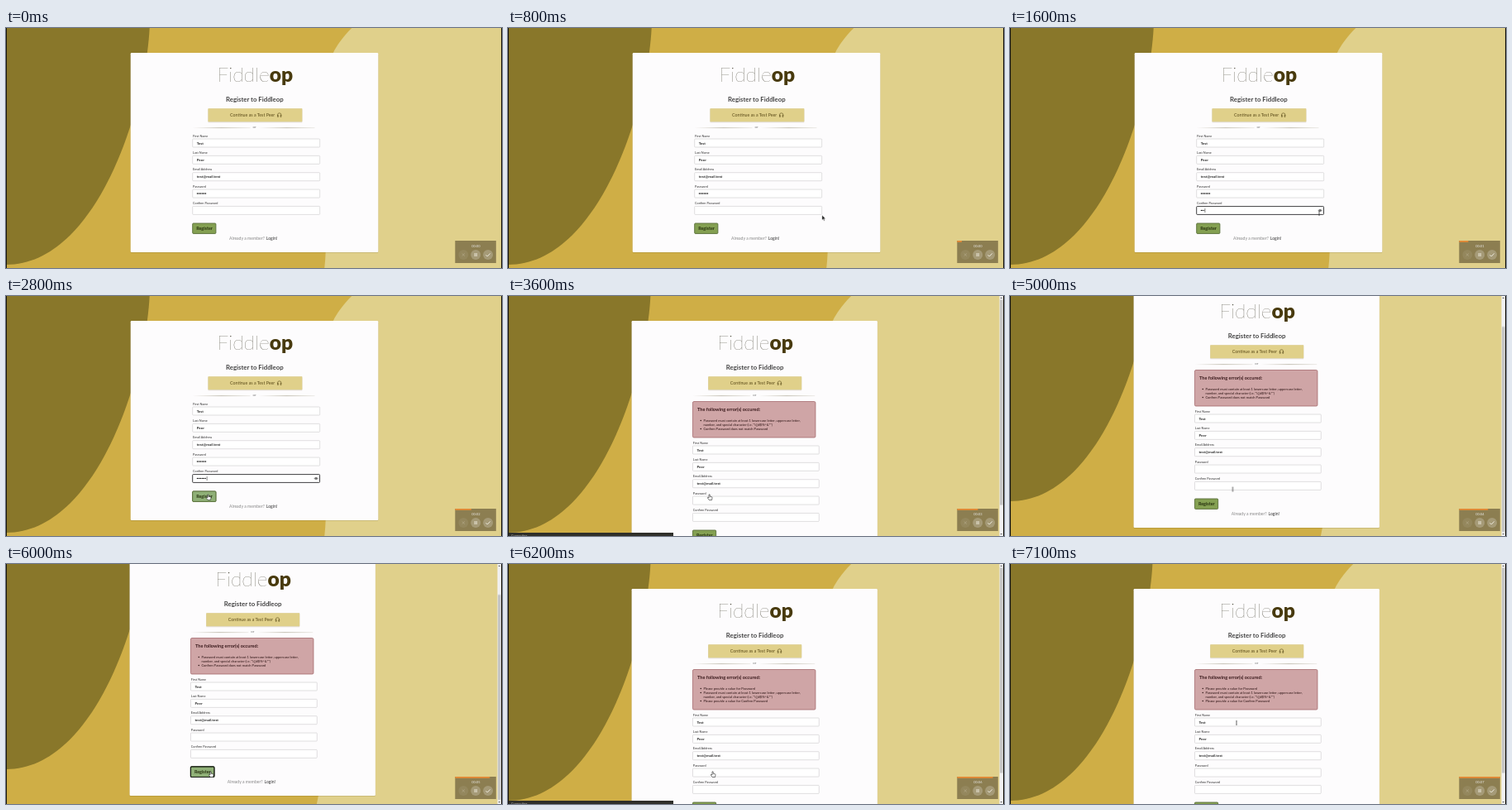
Animation of 600x290 px, one loop 7200 ms. Source, as an HTML page:

```html
<!DOCTYPE html>
<html lang="en">
<head>
<meta charset="utf-8">
<title>Registration form</title>
<style>
html, body { margin: 0; width: 100%; height: 100%; overflow: hidden; background: #cfae46; }
svg { display: block; width: 600px; height: 290px; font-family: Lato, sans-serif; }
text { white-space: pre; }
.b { font-weight: 700; }
.mid { text-anchor: middle; }
.logo { font-size: 24.6px; font-weight: 100; fill: #33301f; }
.logo tspan { font-weight: 900; fill: #483a0d; }
.label { font-size: 3.8px; fill: #333; }
.value { font-size: 4.5px; font-weight: 700; fill: #222; }
.list { font-size: 4px; fill: #2b1212; }
.input { fill: #fff; stroke: #ccc9cb; stroke-width: .6; }
</style>
</head>
<body>
<svg id="stage" viewBox="0 0 600 290">
  <defs>
    <filter id="soft" x="-5%" y="-5%" width="110%" height="115%">
      <feDropShadow dx="0" dy=".4" stdDeviation=".55" flood-color="#4b3b10" flood-opacity=".38"/>
    </filter>
    <linearGradient id="fade">
      <stop offset="0" stop-color="#b9b4a2" stop-opacity="0"/>
      <stop offset=".5" stop-color="#b5b0a0"/>
      <stop offset="1" stop-color="#b9b4a2" stop-opacity=".3"/>
    </linearGradient>
    <clipPath id="digitBox"><rect x="569" y="260" width="6" height="5.5"/></clipPath>
  </defs>
</svg>
<script>
const LOOP = 7200;
const sheet = document.head.appendChild(document.createElement('style'));

// Adds a looping class from [ms, value, easing] stops.
function track(name, prop, stops, ease = 'step-end') {
  const keys = stops.map(([ms, v, e]) =>
    `${ms / LOOP * 100}%{${prop}:${v};animation-timing-function:${e || ease}}`).join('');
  sheet.textContent += `@keyframes ${name}{${keys}}.${name}{animation:${name} ${LOOP}ms infinite}`;
}
const move = (name, stops, ease) =>
  track(name, 'transform', stops.map(([ms, x, y, e]) => [ms, `translate(${x}px,${y}px)`, e]), ease);
function show(name, ...spans) {
  const stops = spans.flatMap(([from, to]) => [[from, 1], [to, 0]]);
  if (stops[0][0] > 0) stops.unshift([0, 0]);
  track(name, 'opacity', stops.filter(s => s[0] < LOOP));
}

const LOAD = 3300, RELOAD = 6150, KEY = 1.45;
show('first', [0, LOAD]);
show('second', [LOAD, RELOAD]);
show('third', [RELOAD, LOOP]);
show('bars', [LOAD, LOOP]);
show('status', [LOAD, 3900], [RELOAD, 6400]);
show('typing', [1000, LOAD]);
show('reveal', [1250, LOAD]);
show('hover1', [2450, LOAD]);
show('hover2', [5350, RELOAD]);
show('ring', [5600, RELOAD]);
show('arrow', [300, 850], [2080, 2450]);
show('beam', [850, 2080], [3800, 5350], [6500, LOOP]);
show('hand', [2450, 3800], [5350, 6500]);

const scroll = y => [[0, 0, 0], [4050, 0, 0, 'ease'], [4450, 0, y], [RELOAD, 0, 0], [LOOP, 0, 0]];
move('scroll', scroll(-38));
move('thumb', scroll(32.6));
move('keys', [[0, 0, 0], ...Array.from({length: 8}, (_, i) => [1250 + i * 140, (i + 1) * KEY, 0])]);
move('digits', [[0, 0, 0], ...Array.from({length: 7}, (_, i) => [1050 + i * 1000, 0, -6 * (i + 1)])]);
track('progress', 'transform', [[0, 'scaleX(0)'], [7100, 'scaleX(1)'], [LOOP, 'scaleX(1)']], 'linear');
move('mouse', [
  [0, 480, 262], [300, 480, 262], [900, 374, 224], [2000, 374, 224], [2500, 245, 243],
  [3700, 244, 243], [4250, 271, 232], [4900, 271, 232], [5450, 248, 254],
  [6500, 248, 254], [7000, 274, 192], [LOOP, 274, 192]
], 'ease-in-out');

const rect = (x, y, w, h, attrs = '') =>
  `<rect x="${x}" y="${y}" width="${w}" height="${h}" ${attrs}/>`;
const text = (x, y, size, str, attrs = '') =>
  `<text x="${x}" y="${y}" font-size="${size}" ${attrs}>${str}</text>`;
const dots = (x, y) => Array.from({length: 8}, (_, i) =>
  `<circle cx="${x + i * KEY}" cy="${y}" r=".7" fill="#222"/>`).join('');

const LABELS = ['First Name', 'Last Name', 'Email Address', 'Password', 'Confirm Password'];
const VALUES = ['Test', 'Peer', 'test@mail.test'];
const RULE = ['Password must contain at least 1 lowercase letter, uppercase letter,',
  'number, and special character (i.e. "!@#$%^&amp;*")'];

function backdrop(w) {
  return rect(0, 0, 600, 345, 'fill="#cfae46"') + `<g transform="scale(${w / 600} 1)">
    <path fill="#89772a" d="M0 0H174C169 97 110 286 0 286Z"/>
    <path fill="#e0d08b" d="M419 0C407 12 401 21 396.5 30C380 60 391 180 387.3 271C386.5 295 382 315 376 345H606V0Z"/></g>`;
}

function errorBox(x, items) {
  const lines = items.flatMap(item => [].concat(item).map((s, i) => [s, i === 0]));
  return rect(x, 127.5, 148.5, 28.5 + lines.length * 5, 'rx="1.5" fill="#cfa5a6" stroke="#9c5c60" stroke-width=".7"') +
    text(x + 5.5, 139.4, 5.65, 'The following error(s) occured:', 'class="b" fill="#3a1a1c"') +
    lines.map(([s, head], i) => {
      const y = 150.6 + i * 5;
      return (head ? `<circle cx="${x + 9.8}" cy="${y}" r=".75" fill="#2b1212"/>` : '') +
        `<text x="${x + 13}" y="${y + 1.3}" class="list">${s}</text>`;
    }).join('');
}

function button(x, y, fill, attrs = '') {
  return `<g ${attrs}>` + rect(x, y, 28.2, 12.4, `rx="1" fill="${fill}" stroke="#5a6f3a" stroke-width=".9"`) +
    text(x + 14.3, y + 8.1, 5.4, 'Register', 'class="b mid" fill="#26300f"') + '</g>';
}

function page(w, items, hover) {
  const cx = 1 + w / 2, x = cx - 74.8, half = w / 4;
  const drop = items ? 32 + 5 * items.flat().length : 0;
  const fields = LABELS.map((label, i) => {
    const y = 139 + drop + i * 20.35;
    return `<text x="${x + .3}" y="${y - 7.5}" class="label">${label}</text>` +
      rect(x, y - 5, w * .257, 10, 'rx=".8" class="input"') +
      `<text x="${x + 5}" y="${y + 1.7}" class="value">${VALUES[i] || ''}</text>`;
  }).join('');
  return backdrop(w) +
    rect(cx - half, 30, half * 2, 241 + drop, 'rx="1.2" fill="#fdfcfd" filter="url(#soft)"') +
    `<text x="${cx + .8}" y="65.3" class="logo mid">Fiddle<tspan>op</tspan></text>` +
    text(cx + .3, 89.2, 7.8, 'Register to Fiddleop', 'class="b mid" fill="#444"') +
    rect(cx - 56, 97.3, w * .19, 16, 'rx=".5" fill="#e0d08a" filter="url(#soft)"') +
    text(cx - 2.4, 107.1, 5.3, 'Continue as a Test Peer', 'class="mid" fill="#5c4c1a"') +
    `<path d="M${cx + 28} 106v-1a2.2 2.2 0 0 1 4.4 0v1m-4.4-.6v2h.9v-2zm3.5 0v2h.9v-2z" fill="none" stroke="#5c4c1a" stroke-width=".6"/>` +
    rect(cx - 75, 120.3, 70, .8, 'fill="url(#fade)"') +
    rect(cx + 5, 120.3, 68, .8, 'fill="url(#fade)"') +
    text(cx, 121.2, 4.4, 'or', 'class="mid" fill="#777"') +
    (items ? errorBox(x, items) : '') + fields +
    button(x, 236 + drop, '#84a052') + button(x, 236 + drop, '#8fb077', `class="${hover}" opacity="0"`) +
    text(cx - 30.5, 256.2 + drop, 5.1, 'Already a member?', 'fill="#888"') +
    text(cx + 14.3, 256.2 + drop, 5.1, 'Login!', 'fill="#333"');
}

const confirmEdit = `<g class="typing" opacity="0">
  ${rect(225.7, 215.6, 153.8, 9.8, 'rx=".8" fill="#fff" stroke="#2e2e30" stroke-width=".9"')}
  ${dots(231.4, 220.4)}
  <g class="keys">${rect(230.6, 217, 13, 7, 'fill="#fff"')}${rect(231, 218, .5, 5, 'fill="#111"')}</g>
  <g class="reveal" opacity="0"><path d="M372.8 220.5q2.3-2.6 4.6 0q-2.3 2.4-4.6 0z" fill="none" stroke="#333" stroke-width=".6"/>
  <circle cx="375.1" cy="220.4" r=".8" fill="#333"/></g></g>`;

const bars = `<g class="bars" opacity="0">
  ${rect(594.5, 0, 4.5, 290, 'fill="#f1f1f1"')}
  <path d="M595.5 3l1.2-1.5 1.2 1.5zM595.5 287l1.2 1.5 1.2-1.5z" fill="#555"/>
  <g class="thumb">${rect(595, 4.5, 3.5, 248, 'fill="#c6c6c6"')}</g></g>
  <g class="status" opacity="0">${rect(0, 286, 200, 4, 'fill="#2f2f2a"')}
  ${text(4, 290.6, 3.8, 'Connecting...', 'fill="#bbb"')}</g>`;

const recorder = rect(543.3, 257, 49.5, 27, 'fill="#5a4c2e" fill-opacity=".62"') +
  rect(543.3, 257, 49.5, 1.8, 'class="progress" fill="#e58a35" style="transform-origin:543.3px 0"') +
  text(571.2, 264.8, 4, '00:0', 'text-anchor="end" fill="#eee"') +
  `<g clip-path="url(#digitBox)"><g class="digits">` +
  Array.from({length: 8}, (_, i) => text(571.2, 264.8 + i * 6, 4, i, 'fill="#eee"')).join('') + '</g></g>' +
  [553.3, 568.2, 583.1].map((x, i) =>
    `<circle cx="${x}" cy="274" r="6" fill="#fff" fill-opacity="${i ? .22 : .07}"/>`).join('') +
  `<g fill="none" stroke="#f4f1e6"><path d="M551.6 272.3l3.4 3.4m0-3.4l-3.4 3.4" stroke-width=".7" opacity=".3"/>
  <path d="M567.2 272v4m2-4v4" stroke-width=".9"/><path d="M580.5 274.2l1.8 1.8 3.4-3.6" stroke-width=".9"/></g>`;

const mouse = `<g class="mouse">
  <path class="arrow" opacity="0" d="M0 0v6l1.4-1.3 1 2.2.9-.4-1-2.1h1.9z" fill="#111" stroke="#fff" stroke-width=".4"/>
  <path class="beam" opacity="0" d="M-1-2.5q1 0 1 .6v3.8q0 .6-1 .6M1-2.5Q0-2.5 0-1.9v3.8q0 .6 1 .6" fill="none" stroke="#222" stroke-width=".4"/>
  <path class="hand" opacity="0" d="M-1-3q.7-.8 1.2 0v2.3l2.2.4q.7.2.6 1l-.5 2.8h-3.3l-1.9-2.6q0-.9.9-.6l.8.6z" fill="#fff" stroke="#111" stroke-width=".55"/></g>`;

const tooWeak = [RULE, 'Confirm Password does not match Password'];
const missing = ['Please provide a value for Password', RULE, 'Please provide a value for Confirm Password'];

document.getElementById('stage').innerHTML += `
  <g class="first">${page(599, null, 'hover1')}${dots(231.4, 200)}${confirmEdit}</g>
  <g class="second" opacity="0"><g class="scroll">${page(594.5, tooWeak, 'hover2')}
    ${rect(223.4, 282.9, 28.6, 12.6, 'class="ring" opacity="0" rx="1.2" fill="none" stroke="#151a14" stroke-width="1.2"')}</g></g>
  <g class="third" opacity="0">${page(594.5, missing, 'idle')}</g>
  ${bars}${rect(0, 0, 1, 290, 'fill="#17150c"')}${rect(599, 0, 1, 290, 'fill="#17150c"')}${recorder}${mouse}`;
</script>
</body>
</html>
```
